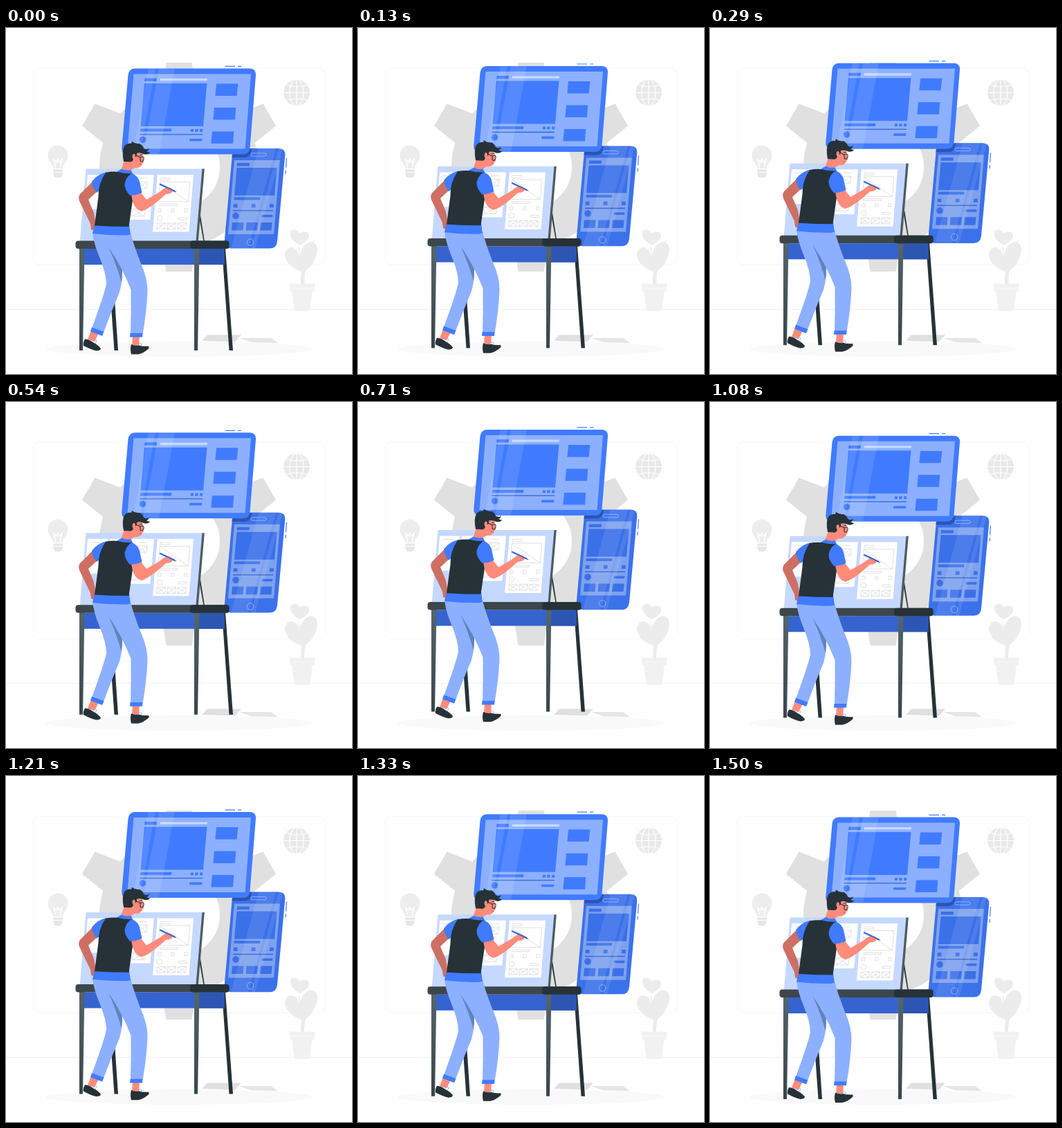
These frames come from a looping animation (500 px wide and 500 px high, 1.54 s). An HTML page:

```html
<!DOCTYPE html>
<html lang="en">
<head>
<meta charset="utf-8">
<title>Designer at a drawing board</title>
<style>
  html, body { margin: 0; width: 100%; height: 100%; overflow: hidden; background: #fff; }
  svg { display: block; width: 100vw; height: 100vh; }
  .blue { fill: #407bff; }
  .pale { fill: #8cb0ff; }
  .dark { fill: #263238; }
  .skin { fill: #ff8b7b; }
  .paper { fill: #fff; }
  .sketch { fill: none; stroke: #d9d9d9; stroke-width: .8; }
</style>
</head>
<body>
<svg viewBox="0 0 500 500">
  <defs>
    <path id="tooth" d="M231.5 50H268.5L275 92H225Z"/>
    <clipPath id="tabletClip"><path d="M187 58.5H352Q361.500 58.5 361 68L352.500 173Q351.500 182.500 342 182.500H176Q166.500 182.500 167.300 173L176.500 68Q177.500 58.500 187 58.500Z"/></clipPath>
    <clipPath id="phoneClip"><path id="phoneBody" d="M337 174H394Q404 174 403.300 184L392 308Q391 318.700 381 318.700H325Q315 318.700 315.600 309L326.800 184Q328 174 337 174Z"/></clipPath>
    <linearGradient id="steel" x2="0" y2="1"><stop stop-color="#55656b"/><stop offset="1" stop-color="#37464c"/></linearGradient>
  </defs>

  <!-- Room -->
  <rect x="39.500" y="58" width="421" height="284" rx="8" fill="none" stroke="#f6f6f6"/>
  <path d="M0 406.500H500" stroke="#f0f0f0"/>
  <ellipse cx="250" cy="464" rx="193" ry="11" fill="#f9f9f9"/>
  <path d="M291 443.500H340L331 453.500 283 452Z" fill="#e0e0e0"/>
  <path d="M337 448H383L393 455.500 353 454Z" fill="#e6e6e6"/>

  <g fill="#e0e0e0">
    <circle cx="250" cy="201" r="87" fill="none" stroke="#e0e0e0" stroke-width="56"/>
    <g id="teeth"></g>
  </g>

  <circle cx="420" cy="93.500" r="19" fill="#e9e9e9"/>
  <g fill="none" stroke="#fff" stroke-width="1.200">
    <path d="M401 93.500H439M420 74.500V112.500M405 82.500Q420 87 435 82.500M405 104.500Q420 100 435 104.500"/>
    <ellipse cx="420" cy="93.500" rx="10" ry="19"/>
  </g>

  <path d="M68.500 203C68 197 60.500 194 60.500 184A14.500 14.500 0 0 1 89.500 184C89.500 194 82 197 81.500 203Z" fill="#ededed"/>
  <path d="M72 202L69 190 73 194 75 189 77 194 81 190 78 202" fill="none" stroke="#fff" stroke-width="1.300"/>
  <path d="M68 204.500H82V208H68ZM68 209H82L80.500 215Q75 218 69.500 215Z" fill="#e6e6e6"/>

  <g fill="#ececec">
    <path d="M425 314C411 307 408 296 413 292.500Q420 289 424.500 297Q431 292 437 296.500C441 303 434 309 425 314Z"/>
    <path d="M427 352C416 348 403 340 403 327Q405 316 414 317Q422 319 424 331Q428 311 441 309Q453 311 449 327C446 341 436 348 432 353L431 370H425.500Z"/>
    <path d="M422 310L428.500 340 425 342Z"/>
  </g>
  <path d="M409 369.500H447L445 381 442.500 381 439.500 406Q439 409 436 409H420Q417 409 416.500 406L413.500 381 411 381Z" fill="#f1f1f1"/>
  <path d="M413 376H443" stroke="#fafafa"/>

  <g id="desk">
    <!-- Phone -->
    <use href="#phoneBody" fill="#3b71ea"/>
    <path d="M330 191H396L387 298H321Z" fill="#7ea1ee"/>
    <g clip-path="url(#phoneClip)">
      <path d="M320 174H355Q354 187 345 187H324Z" fill="#2c54b0"/>
    </g>
    <g fill="#3a70e8">
      <path d="M334 195H352L351.600 199.500H333.600ZM333.500 202H391.500L388 242H330ZM330 244.500H367.500L367 248.500H329.600Z"/>
      <path d="M329 254.300H334.500V259.500H328.500ZM355 254.300H360.500V259.500H354.500ZM381.300 254.300H386.800V259.500H380.800ZM370 270H385.500L385 273.500H369.600Z"/>
      <path d="M327 281H343.500L342.500 292.500H326ZM347.500 281H364L363 292.500H346.500ZM368 281H384.500L383.500 292.500H367Z"/>
      <circle cx="332" cy="271.500" r="4.800"/>
    </g>
    <path d="M328 264H386" stroke="#2f5fc9" stroke-width="1.300"/>
    <g clip-path="url(#phoneClip)" fill="#fff" opacity=".09">
      <path d="M365 174H390L350 319H325ZM394 174H400L360 319H354Z"/>
    </g>
    <g fill="none" stroke="#8cb0ff">
      <rect x="354" y="181" width="22" height="4.300" rx="2"/>
      <circle cx="353" cy="309.700" r="4.800"/>
    </g>
    <path d="M405.500 188L404.500 202M404.300 206L404 211M316.500 55.500H331M335 55.500H340" stroke="#407bff" stroke-width="1.200"/>

    <!-- Tablet -->
    <g clip-path="url(#tabletClip)">
      <path class="blue" d="M160 50H365V190H160Z"/>
      <path class="pale" d="M184.500 66.500H354L345.500 174.500H175.500Z"/>
      <path d="M223 73H291L290.600 76.300H222.700Z" fill="#c5d8ff"/>
      <g class="blue">
        <path d="M200.500 72.500H218L217.600 77H200ZM200 80H290.500L285 142H194.500ZM194.500 145.500H239.500L239 149.700H194Z"/>
        <path d="M304 80.500H335.500L333.500 98H302.300ZM301 115H332.300L331 132.500H299.300ZM298 149.500H329.300L328 167H296.300Z"/>
        <path d="M267 146H271.200L270.800 150H266.600ZM273.500 146H277.700L277.300 150H273.100ZM280.200 146H284.400L284 150H279.800ZM265.500 160H283.300L283 163.700H265Z"/>
        <circle cx="197.500" cy="161.500" r="4.700"/>
      </g>
      <path d="M193.500 154H284" stroke="#3566d4" stroke-width="1.300"/>
      <path d="M206 58H216L193 183H183ZM221 58H244L221 183H198Z" fill="#fff" opacity=".1"/>
    </g>

    <!-- Board -->
    <path d="M279 258L287 309H285.500L278 266Z" class="dark"/>
    <path d="M115.500 203.500H284L275 308H106.800Z" fill="#c5d8ff"/>
    <path d="M283.500 203.500H286.800L277.800 308H274.500Z" fill="#4c5b62"/>
    <path class="paper" d="M118 212H147L143 262H114ZM150 212H214L208.300 277H145ZM218.800 212H271L264.500 294.500H212Z"/>
    <g class="sketch">
      <path d="M223 217H237L236.700 220H222.700ZM222.500 222.500H265.800L263.500 251H220ZM223 223L263 251M222.500 254.500H248L247.700 257H222Z"/>
      <path d="M220 261.500H224V266H219.500ZM239 261.500H243V266H238.500ZM258 261.500H262V266H257.500ZM249.500 274H261V277H249Z"/>
      <circle cx="222" cy="275" r="3.800"/>
      <path d="M218.500 282H230.500L229.500 290.500H217.500ZM233.500 282H245.500L244.500 290.500H232.500ZM248.500 282H260.500L259.500 290.500H247.500ZM218.500 282L229.500 290.500M230.500 282L217.500 290.500M233.500 282L244.500 290.500M245.500 282L232.500 290.500M248.500 282L259.500 290.500M260.500 282L247.500 290.500"/>
      <path d="M190 222H204L203 232H189ZM190 222L203 232M204 222L189 232M183 262H201L200 272H182ZM183 262L200 272M201 262L182 272M192 217H204M122 217H136"/>
    </g>

    <!-- Table -->
    <path class="dark" d="M312 318H317L328 466H322.500ZM146 318H152L162 466H156.500Z"/>
    <path d="M112 319H315.500V342H112Z" fill="#3563cf"/>
    <path d="M278 319H315.500V342H278Z" fill="#2d55b3"/>
    <path d="M106 318H113.500L111 466H106ZM272 318H279.500L277 466H272Z" fill="url(#steel)"/>
    <rect x="100.500" y="307.500" width="222" height="11.500" rx="4" fill="#3b474c"/>
    <rect x="266" y="307.500" width="56.500" height="11.500" rx="4" class="dark"/>
  </g>

  <g id="person">
    <!-- Legs -->
    <path class="skin" d="M123 437L134 441 128 453 118 450ZM183 444H193L192 460H182Z"/>
    <path class="pale" d="M125 296Q127 312 135 331Q145 355 145 370Q142 385 124 434L141 440Q152 410 164 382Q170 362 167 335L160 297Z"/>
    <path d="M148 316L167 337Q169 352 167 368Q160 343 148 316Z" fill="#6382bd"/>
    <path class="pale" d="M136 296H180Q184 312 194 338Q205 362 204.500 381Q203 412 197.500 443H180Q181 410 180.500 378Q168 346 149 318Z"/>
    <path class="blue" d="M124 432.500L141.500 439 139 445 122 438.500ZM179.500 441H197.500L197 446.700H179Z"/>
    <path class="dark" d="M114 449.500Q121 450 126 454.500Q132 457 137 463Q137 466 131 466.500Q123 465 112 459Q111 455 114 449.500ZM181 457Q186 460 192 458.500Q198 460.500 206.500 460V463Q199 470 191 471.500H181Q179 464 181 457Z"/>
    <path d="M126 454Q127 449 131 452L129 456M191 459Q193 453 196 457L195 460" fill="none" stroke="#8cb0ff"/>

    <!-- Torso -->
    <path d="M125 222L107 240Q104 244 106 250L122 283 123 291Q128 294 131 290L127 267 119 248 134 234Z" fill="#ce6f64"/>
    <path class="blue" d="M146 208Q132 211 124 222Q125 231 131 238L138 232ZM128 284H178L180 299Q178 298 176 299.500Q150 300 125 297Z"/>
    <path class="blue" d="M158 209L167 203.500 180 204 184 212H160Z"/>
    <path class="dark" d="M144 209Q153 207 162 208Q172 211 183 210L180 228 184 242 177.500 287Q152 287 128 285.500L133.500 244Q133 225 144 209Z"/>

    <!-- Head -->
    <path class="skin" d="M172 188L167 203Q172 207 181 205L186 202Q195 203 197 196L199 194 197.500 183 193 177 182 180Z"/>
    <path class="dark" d="M170 193Q167 178 171 171Q175 166 181 167L182 164Q187 168 193 167Q198 170 199 174Q205 177 207 173Q206 178 203 178Q207 181 209 179Q205 184 199 182Q193 179 189 181Q189 186 187 187Q187 181 184 182Q181 185 184 190Q182 194 179 193.500Z"/>
    <path d="M188 184L194 187M194 187Q200 184 199 190Q197 195 194 192ZM193 184L197 183" fill="none" stroke="#263238" stroke-width="1.100"/>
    <path d="M192 197L196 197" stroke="#d96c60"/>

    <!-- Drawing arm -->
    <path d="M223 226L243 235.500" stroke="#3566d4" stroke-width="2.200" stroke-linecap="round"/>
    <path d="M243 235.500L246 237" stroke="#263238"/>
    <path class="skin" d="M181 239Q183 261 195 264.500Q203 264 222 248L231 240Q238 240 240 237Q241 233 238 231Q232 229 227 233L222 237 203 248 195 238Z"/>
    <path d="M230 229.300L243 235.500" stroke="#3566d4" stroke-width="1.800"/>
    <path class="blue" d="M182 210Q191 214 193 222L196.500 238Q188 242 179 242Q171 233 171.500 225Q174 214 182 210Z"/>
  </g>
</svg>
<script>
  const byId = id => document.getElementById(id);
  const PERIOD = 1540, TRAVEL = 20, LEAD = 42;

  for (let angle = 0; angle < 360; angle += 60) {
    byId('teeth').innerHTML += `<use href="#tooth" transform="rotate(${angle} 250 201)"/>`;
  }

  const shift = (id, y) => byId(id).setAttribute('transform', `translate(0 ${y.toFixed(2)})`);

  // Steady rise and fall; the person moves half as far as the desk.
  function draw() {
    const phase = (performance.now() + LEAD) / PERIOD % 1;
    const y = 1 - TRAVEL * (1 - Math.abs(1 - 2 * phase));
    shift('desk', y);
    shift('person', y / 2);
    requestAnimationFrame(draw);
  }
  draw();
</script>
</body>
</html>
```
